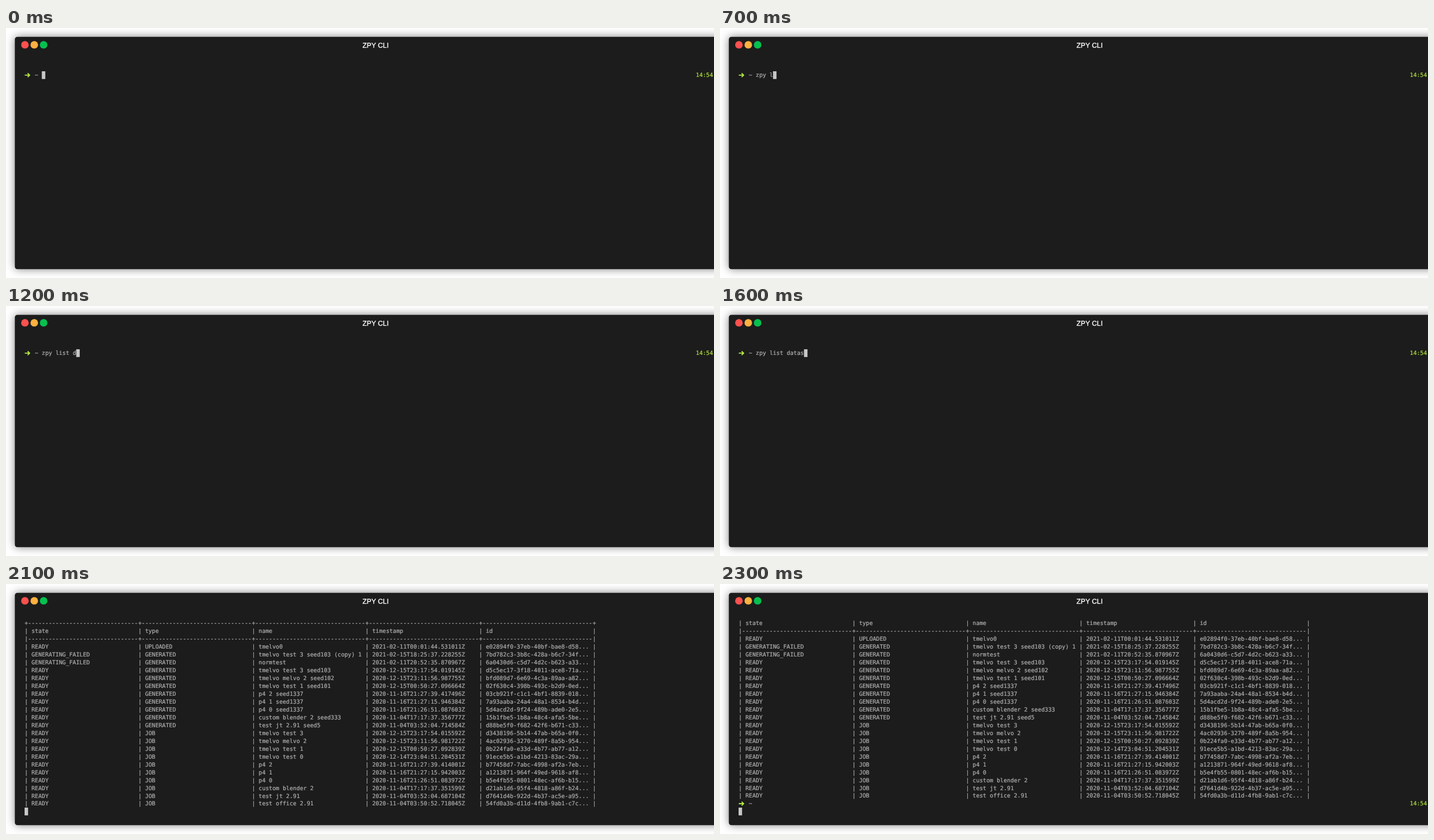
These frames come from a looping animation (1257x445 px, 2400 ms). An HTML page:

```html
<!DOCTYPE html>
<html lang="en">
<head>
<meta charset="utf-8">
<title>ZPY CLI</title>
<style>
  html, body { margin: 0; width: 100%; height: 100%; overflow: hidden; background: #fff; }
  svg { display: block; width: 100%; height: 100%; overflow: hidden; }
  .window { fill: #1c1c1c; filter: drop-shadow(0 0 7.5px rgba(0, 0, 0, .5)); }
  text {
    font: 10.15px "DejaVu Sans Mono", monospace; fill: #afafaf;
    stroke: #afafaf; stroke-width: .22px;
    white-space: pre; text-rendering: geometricPrecision;
  }
  .title {
    font: 12.3px "Liberation Sans", Arial, sans-serif; text-anchor: middle;
    fill: #fff; stroke: #fff; stroke-width: .35px;
  }
  .clock { fill: #b3e33b; stroke: #b3e33b; }
  .arrow { fill: none; stroke: #b7eb46; stroke-width: 1.9; }
  #cursor { fill: #c7c7c7; }
</style>
</head>
<body>
<svg viewBox="0 0 1257 445">
  <rect class="window" x="15.7" y="15.7" width="1281" height="413.6" rx="4.5"/>
  <circle cx="33.6" cy="29.9" r="6.7" fill="#fc514f"/>
  <circle cx="50.2" cy="29.9" r="6.7" fill="#fdb13f"/>
  <circle cx="66.8" cy="29.9" r="6.7" fill="#05c14f"/>
  <text class="title" x="656.2" y="35">ZPY CLI</text>
  <g id="table"></g>
  <g id="prompt">
    <path class="arrow" d="M33.4 6.9h8M38.4 3.5l3.5 3.4-3.5 3.4"/>
  </g>
  <rect id="cursor" width="6.2" height="13.8"/>
</svg>
<script>
const CELL = 6.112, LINE = 13.957, LEFT = 33, TOP = 63.05, BASELINE = 10.4;
const COLUMN = 33, STEP = 100, STEPS = 24;
const COMMAND = 'zpy list datasets';
const HEADER = ['state', 'type', 'name', 'timestamp', 'id'];

const jobs = {
  'READY|UPLOADED': `tmelvo0|2021-02-11T00:01:44.531011Z|e02894f0-37eb-40bf-bae8-d58`,
  'GENERATING_FAILED|GENERATED': `tmelvo test 3 seed103 (copy) 1|2021-02-15T18:25:37.228255Z|7bd782c3-3b8c-428a-b6c7-34f
normtest|2021-02-11T20:52:35.870967Z|6a0430d6-c5d7-4d2c-b623-a33`,
  'READY|GENERATED': `tmelvo test 3 seed103|2020-12-15T23:17:54.019145Z|d5c5ec17-3f18-4011-ace8-71a
tmelvo melvo 2 seed102|2020-12-15T23:11:56.987755Z|bfd089d7-6e69-4c3a-89aa-a82
tmelvo test 1 seed101|2020-12-15T00:50:27.096664Z|02f630c4-398b-493c-b2d9-0ed
p4 2 seed1337|2020-11-16T21:27:39.417496Z|03cb921f-c1c1-4bf1-8839-018
p4 1 seed1337|2020-11-16T21:27:15.946384Z|7a93aaba-24a4-48a1-8534-b4d
p4 0 seed1337|2020-11-16T21:26:51.087603Z|5d4acd2d-9f24-489b-ade0-2e5
custom blender 2 seed333|2020-11-04T17:17:37.356777Z|15b1fbe5-1b8a-48c4-afa5-5be
test jt 2.91 seed5|2020-11-04T03:52:04.714584Z|d88be5f0-f682-42f6-b671-c33`,
  'READY|JOB': `tmelvo test 3|2020-12-15T23:17:54.015592Z|d3438196-5b14-47ab-b65a-0f0
tmelvo melvo 2|2020-12-15T23:11:56.981722Z|4ac02936-3270-489f-8a5b-954
tmelvo test 1|2020-12-15T00:50:27.092839Z|0b224fa0-e33d-4b77-ab77-a12
tmelvo test 0|2020-12-14T23:04:51.204531Z|91ece5b5-a1bd-4213-83ac-29a
p4 2|2020-11-16T21:27:39.414001Z|b77458d7-7abc-4998-af2a-7eb
p4 1|2020-11-16T21:27:15.942003Z|a1213871-964f-49ed-9618-af8
p4 0|2020-11-16T21:26:51.083972Z|b5e4fb55-0801-48ec-af6b-b15
custom blender 2|2020-11-04T17:17:37.351599Z|d21ab1d6-95f4-4818-a86f-b24
test jt 2.91|2020-11-04T03:52:04.687104Z|d7641d4b-922d-4b37-ac5e-a95
test office 2.91|2020-11-04T03:50:52.718045Z|54fd0a3b-d11d-4fb8-9ab1-c7c`
};

const [table, prompt, cursor] = ['table', 'prompt', 'cursor'].map(id => document.getElementById(id));

function addText(parent, content, col, row, className = '') {
  const node = document.createElementNS('http://www.w3.org/2000/svg', 'text');
  node.setAttribute('x', LEFT + col * CELL);
  node.setAttribute('y', row * LINE + BASELINE);
  node.setAttribute('class', className);
  node.textContent = content;
  parent.append(node);
  return node;
}

function addRule(row, edge) {
  const rules = HEADER.map((_, i) =>
    addText(table, (i ? '+' : edge) + '-'.repeat(COLUMN - 1), i * COLUMN, row));
  rules.push(addText(table, edge, HEADER.length * COLUMN, row));
  return rules;
}

function addRow(cells, row) {
  cells.forEach((cell, i) => addText(table, '| ' + cell, i * COLUMN, row));
  addText(table, '|', cells.length * COLUMN, row);
}

const topBorder = addRule(0, '+');
addRow(HEADER, 1);
addRule(2, '|');
let nextRow = 3;
for (const [kind, lines] of Object.entries(jobs)) {
  for (const line of lines.split('\n')) addRow(`${kind}|${line}...`.split('|'), nextRow++);
}

addText(prompt, '~', 3, 0);
addText(prompt, '14:54', 195, 0, 'clock');
const typed = addText(prompt, '', 5, 0);

const show = (node, visible) => node.setAttribute('visibility', visible ? 'visible' : 'hidden');
const moveTo = (node, col, row) =>
  node.setAttribute('transform', `translate(${col * CELL} ${TOP + row * LINE})`);

function draw(step) {
  const listed = step >= 21, scrolled = step === 23;
  const count = listed ? 0 : Math.min(Math.max(step - 2, 0), COMMAND.length);

  show(table, listed);
  moveTo(table, 0, scrolled ? -1 : 0);
  topBorder.forEach(node => show(node, listed && !scrolled));

  typed.textContent = COMMAND.slice(0, count);
  show(prompt, step !== 21);
  moveTo(prompt, 0, !listed ? 1 : scrolled ? 23 : 24);

  const atLineStart = step === 20 || step === 21 || scrolled;
  cursor.setAttribute('x', LEFT);
  moveTo(cursor, atLineStart ? 0 : 5 + count, listed ? 24 : step === 20 ? 2 : 1);
}

const start = performance.now();
function tick() {
  draw(Math.floor((performance.now() - start) / STEP) % STEPS);
  requestAnimationFrame(tick);
}
tick();
</script>
</body>
</html>
```
